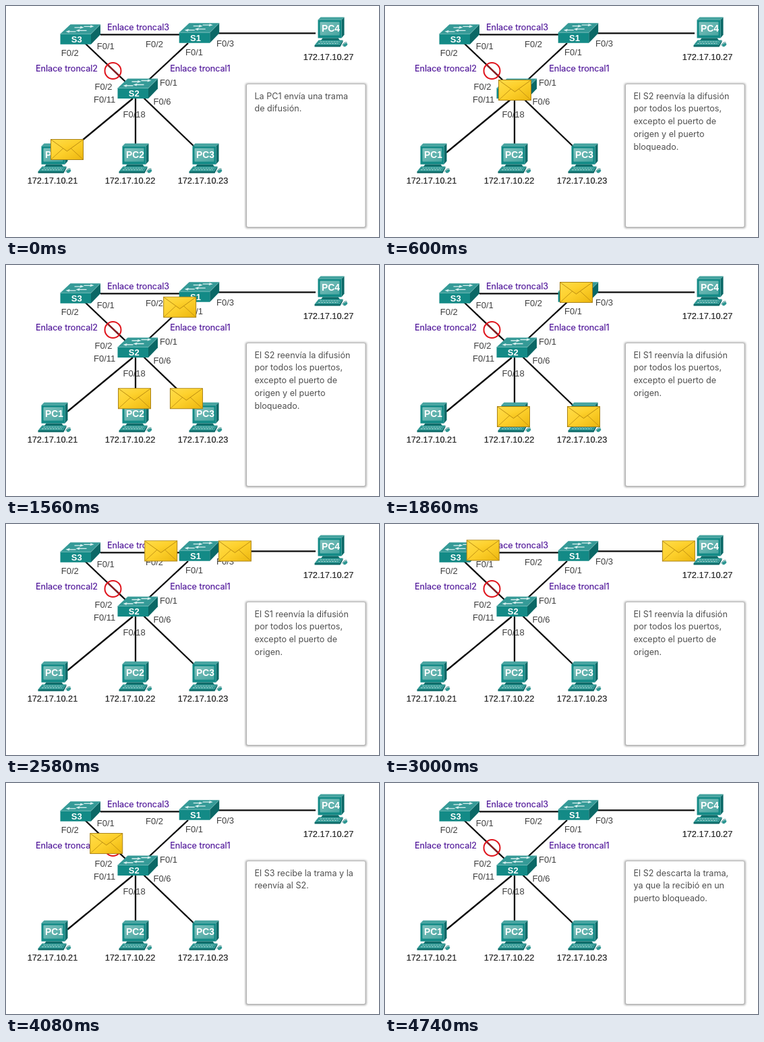
An HTML page that plays this animation: 553 by 342 pixels, repeating every 4980 ms.

```html
<!DOCTYPE html>
<html lang="es">
<head>
<meta charset="utf-8">
<title>Difusión en una red conmutada</title>
<style>
  html, body { margin: 0; width: 100%; height: 100%; overflow: hidden; background: #fff; }
  svg { display: block; width: 100vw; height: 100vh; }
  .link { stroke: #0a0a0a; stroke-width: 2.3; }
  .trunk { font: 12.6px Inter, "Liberation Sans", sans-serif; fill: #51189a; stroke: #51189a; stroke-width: .2; }
  .port { font: 13px "Liberation Sans", Arial, sans-serif; fill: #404040; }
  .ip { font: 12.8px "Liberation Sans", Arial, sans-serif; fill: #222; stroke: #222; stroke-width: .2; text-anchor: middle; }
  .name { font: bold 13px "Liberation Sans", Arial, sans-serif; fill: #fff; text-anchor: middle; }
  .host { font-size: 13.8px; }
  .note { font: 12.6px Inter, "Liberation Sans", sans-serif; fill: #505050; }
</style>
</head>
<body>
<svg id="stage" viewBox="0 0 553 342" xmlns="http://www.w3.org/2000/svg">
  <defs>
    <linearGradient id="gold" x1="0" y1="0" x2="1" y2="1">
      <stop offset="0" stop-color="#ffdc4a"/>
      <stop offset=".5" stop-color="#fdd02c"/>
      <stop offset="1" stop-color="#ecb60e"/>
    </linearGradient>
    <linearGradient id="screen" x1="0" y1="0" x2="1" y2="1">
      <stop offset="0" stop-color="#7fc2be"/>
      <stop offset="1" stop-color="#48a5a0"/>
    </linearGradient>
    <filter id="soft" x="-10%" y="-10%" width="120%" height="120%">
      <feGaussianBlur stdDeviation="1.5"/>
    </filter>

    <g id="switch">
      <path d="M0 14L15 0H59.500L45.500 14Z" fill="#359a97"/>
      <path d="M45.500 14L59.500 0V15L45.500 29.500Z" fill="#0b6866"/>
      <path d="M0 14H45.500V29.500H0Z" fill="#138a86"/>
      <path d="M0 14H45.500L59.500 0" fill="none" stroke="#7cc0bd" stroke-width=".7"/>
      <path d="M21 4.500H31M35 3H46M13 10.500H23M28 9H39" stroke="#d9f0f0" stroke-width="1.300"/>
      <path d="M30 2.500L35 4.500L29 6.500ZM45 1L50 3L44 5ZM14 8.500L8 10.500L13 12.500ZM29 7L23 9L28 11Z" fill="#d9f0f0"/>
    </g>

    <g id="pc">
      <path d="M5 4L9 0H44L40 4Z" fill="#45a39f"/>
      <path d="M40 4L44 0V26L40 31Z" fill="#0b6866"/>
      <rect x="5" y="4" width="35" height="27" fill="#138a86"/>
      <rect x="8" y="7" width="29" height="20" rx="1" fill="url(#screen)"/>
      <path d="M12 31H35L38 35H9Z" fill="#0b6866"/>
      <path d="M6 34H42L37 41.500H0Z" fill="#2f9793"/>
      <path d="M0 41.500H37L42 34V36.500L38 44H0Z" fill="#0b6866"/>
      <path d="M8 36.500H37M5.500 39H35" stroke="#a8d6d3" stroke-width="1" stroke-dasharray="3 1"/>
      <path d="M41 42Q44 36 48 37.500" fill="none" stroke="#0b6866" stroke-width=".8"/>
      <ellipse cx="45.500" cy="41" rx="3.500" ry="2.200" fill="#2f9793" transform="rotate(-30 45.500 41)"/>
    </g>

    <g id="mail">
      <rect x=".5" y=".5" width="48" height="30" fill="url(#gold)" stroke="#a98217"/>
      <path d="M1 30L19 13.500M48 30L30 13.500" stroke="#c08f14" stroke-width=".9"/>
      <path d="M1 1L24.500 18L48 1" fill="url(#gold)" stroke="#b5860f" stroke-width=".9"/>
    </g>
  </defs>
  <g id="net"></g>
  <g id="panel">
    <rect x="355" y="114.500" width="179.500" height="214.500" rx="3" fill="#777" opacity=".65" filter="url(#soft)"/>
    <rect x="357" y="116" width="175.500" height="211" rx="2" fill="#fff"/>
  </g>
  <g id="note"></g>
  <g id="mails"></g>
</svg>
<script>
const LOOP = 4980, TICK = 60;
const NS = "http://www.w3.org/2000/svg";
const byId = id => document.getElementById(id);

function add(parent, tag, attrs, text) {
  const el = document.createElementNS(NS, tag);
  for (const key in attrs) el.setAttribute(key, attrs[key]);
  if (text) el.textContent = text;
  parent.appendChild(el);
  return el;
}

const net = byId("net");
const label = (cls, text, x, y) => add(net, "text", { class: cls, x, y }, text);

// Cables
[
  [140, 42.3, 258, 42.3], [315, 40.3, 459, 40.3], [117, 55, 178, 113], [270, 55, 212, 109],
  [188, 137, 91, 217], [192, 136, 192, 206], [203, 135, 279, 208]
].forEach(([x1, y1, x2, y2]) => add(net, "line", { class: "link", x1, y1, x2, y2 }));

// Blocked port
add(net, "line", { x1: 150, y1: 86.4, x2: 167, y2: 102.5, stroke: "#8c1f24", "stroke-width": 2.3 });
add(net, "circle", { cx: 158.5, cy: 96, r: 12, fill: "none", stroke: "#e0141c", "stroke-width": 2 });

[["S3", 80.5, 27.3], ["S1", 256.7, 25.2], ["S2", 165.5, 107.5]].forEach(([name, x, y]) => {
  add(net, "use", { href: "#switch", x, y });
  label("name", name, x + 24.3, y + 26.3);
});

[
  ["PC1", 47.5, 203.5, "172.17.10.21", 69, 263], ["PC2", 167.5, 203.5, "172.17.10.22", 184, 263],
  ["PC3", 271.5, 203.5, "172.17.10.23", 292, 263], ["PC4", 457.5, 16.5, "172.17.10.27", 478, 79.7]
].forEach(([name, x, y, ip, ipX, ipY]) => {
  add(net, "use", { href: "#pc", x, y });
  label("name host", name, x + 24, y + 21.5);
  label("ip", ip, ipX, ipY);
});

[["Enlace troncal3", 150, 35.6], ["Enlace troncal2", 44, 97], ["Enlace troncal1", 243.3, 97]]
  .forEach(([text, x, y]) => label("trunk", text, x, y));

[
  ["F0/1", 134.8, 64], ["F0/2", 81.8, 74], ["F0/2", 207, 61], ["F0/3", 312, 60], ["F0/1", 266, 72.8],
  ["F0/2", 131.5, 123.5], ["F0/11", 130, 143], ["F0/1", 228, 118.2], ["F0/6", 218.5, 145.7], ["F0/18", 173.5, 165.2]
].forEach(([text, x, y]) => label("port", text, x, y));

const notes = [
  { at: 0, lines: ["La PC1 envía una trama", "de difusión."] },
  { at: 600, lines: ["El S2 reenvía la difusión", "por todos los puertos,", "excepto el puerto de", "origen y el puerto", "bloqueado."] },
  { at: 1860, lines: ["El S1 reenvía la difusión", "por todos los puertos,", "excepto el puerto de", "origen."] },
  { at: 3180, lines: ["El S3 recibe la trama y la", "reenvía al S2."] },
  { at: 4200, lines: ["El S2 descarta la trama,", "ya que la recibió en un", "puerto bloqueado."] }
];
for (const note of notes) {
  note.el = add(byId("note"), "g", { class: "note" });
  note.lines.forEach((line, i) => add(note.el, "text", { x: 368.5, y: 137.5 + 18.8 * i }, line));
}

// show/hide: visible span; start/end: travel span
const hop = (show, hide, start, end, from, to) => ({
  show, hide, start, end, from, to, el: add(byId("mails"), "use", { href: "#mail" })
});
const hops = [
  hop(0, 1020, 0, 600, [66, 197], [168, 109]),
  hop(1020, 2340, 1020, 1800, [175, 96], [259, 25]),
  hop(1020, 2340, 1020, 1800, [166, 122], [166, 209]),
  hop(1020, 2340, 1020, 1800, [182, 122], [270, 209]),
  hop(2340, 3600, 2340, 3180, [253.5, 25], [84.5, 23]),
  hop(2340, 3600, 2340, 3180, [260, 24.5], [452, 24.5]),
  hop(3600, 4740, 3560, 4180, [84, 22.3], [132, 84])
];
const FADE_START = 4440, FADE_END = 4740;

const clamp = v => Math.max(0, Math.min(1, v));
const setVisible = (el, on) => el.setAttribute("visibility", on ? "visible" : "hidden");

function render(t) {
  notes.forEach((note, i) => {
    const next = notes[i + 1];
    setVisible(note.el, t >= note.at && (!next || t < next.at));
  });
  const opacity = 1 - clamp((t - FADE_START) / (FADE_END - FADE_START));
  for (const h of hops) {
    const p = clamp((t - h.start) / (h.end - h.start));
    const [x, y] = h.from.map((v, i) => v + (h.to[i] - v) * p);
    h.el.setAttribute("transform", `translate(${x} ${y})`);
    h.el.setAttribute("opacity", opacity);
    setVisible(h.el, t >= h.show && t < h.hide);
  }
}

const origin = performance.now();
function frame() {
  const t = (performance.now() - origin) % LOOP;
  render(Math.floor(t / TICK) * TICK);
  requestAnimationFrame(frame);
}
render(0);
requestAnimationFrame(frame);
</script>
</body>
</html>
```
